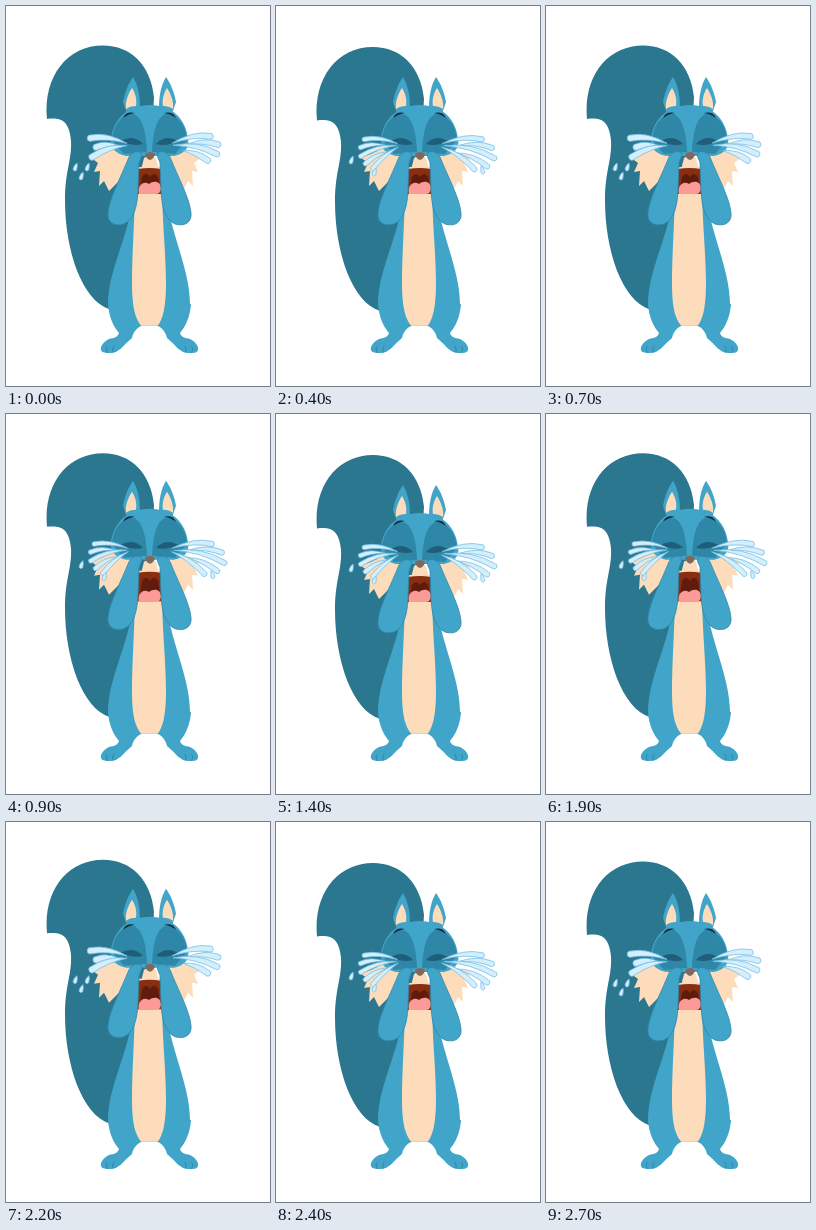
These frames come from a looping animation (264x380 px, 2800 ms). An HTML page:

```html
<!DOCTYPE html>
<html lang="en">
<head>
<meta charset="utf-8">
<title>Crying squirrel</title>
<style>
  html, body { margin: 0; width: 100%; height: 100%; overflow: hidden; background: #fff; }
  svg { display: block; width: 264px; height: 380px; }
  .tail { fill: #2b778f; }
  .blue { fill: #41a4c9; }
  .mask { fill: #2f87a7; }
  .lid { fill: #1f5d79; }
  .brow { fill: #14293a; }
  .cream { fill: #fddcbb; }
  .toe { fill: none; stroke: #2f87a8; stroke-linecap: round; }
  .arm { fill: #41a4c9; stroke: #2f87a8; stroke-width: .8; }
  .tear { fill: #d3eefc; stroke: #78bfe3; stroke-width: .8; stroke-linejoin: round; }
</style>
</head>
<body>
<svg viewBox="0 0 264 380">
  <defs>
    <g id="leg">
      <path class="blue" d="M102 298C103 312 108 321 113 327C112 331 108 332 103 333C97 336 94 341 95 344C96 347 99 347 104 347C114 347 117 339 126 332C127 327 130 322 137 319L144 298Z"/>
      <path class="toe" d="M101 341Q99 344 101 346M108 340Q106 343 107 346"/>
    </g>
    <path id="ear" class="blue" d="M121 108L117 96C119 86 122 78 127 71C132 79 134 90 134 102Z"/>
    <path id="earInside" class="cream" d="M120 103C119 96 122 88 126 82C130 88 131 95 130 100Q124 100 120 103Z"/>
    <path id="fur" class="cream" d="M106 142Q96 149 84 151L92 157L88 166L94 165L93 180L98 175L103 185L110 178L126 162L126 142Z"/>
    <path id="arm" class="arm" d="M123 151C126 146 131 144 135 147C137 150 134 153 133 157L132 185C131 203 127 214 118 218C108 221 101 216 102 207C103 193 115 171 123 151Z"/>
    <g id="eye">
      <path class="mask" d="M106 134C107 118 117 107 128 108C136 112 140 124 141 146L118 148Z"/>
      <path class="lid" d="M115 135Q127 128 137 138Q127 141 115 135Z"/>
      <path class="brow" d="M117 112Q120 105 129 107Q122 108 117 112Z"/>
    </g>
  </defs>

  <path id="tail" class="tail" d="M41 113.500C37 70 62 40 97 40C125 40 145 60 148 92L142 200L120 308L104 304C76 295 59 245 59 195C59 165 66 155 65 135C63 114 54 112 41 113.500Z"/>

  <use href="#leg"/>
  <use href="#leg" transform="matrix(-1 0 0 1 287 0)"/>
  <path class="blue" d="M127 185C126 225 102 262 102 298L137 319.500L152 319.500L184 298C184 262 163 225 160 185Z"/>
  <path class="cream" d="M129 188L156 188C157 225 160 250 160 278C160 300 157 313 152 319.500L135 319.500C129 313 126 300 126 278C126 250 128 225 129 188Z"/>

  <g id="head">
    <use href="#ear"/>
    <use href="#earInside"/>
    <g transform="matrix(-1 0 0 1 287 0)"><use href="#ear"/><use href="#earInside"/></g>
    <use href="#fur"/>
    <use href="#fur" transform="matrix(-1 0 0 1 280 0)"/>
    <path class="blue" d="M144 99C166 99 180 113 182 133C184 142 178 148 168 150L120 150C110 148 104 142 105 133C107 113 122 99 144 99Z"/>
    <use href="#eye"/>
    <use href="#eye" transform="matrix(-1 0 0 1 287 0)"/>
    <path class="cream" d="M138 152Q144 147 150 152L154 168L134 168Z"/>
    <path fill="#80685d" d="M139 148Q144 144 149 148Q148 153 144 154Q140 153 139 148Z"/>
  </g>

  <path id="chin" class="cream"/>
  <path id="mouth" fill="#8a2e12"/>
  <path id="throat" fill="#5f1c0d"/>
  <path fill="#fb9a96" d="M133 188C131 180 137 174 143 178C148 174 155 175 155 183Q154 188 150 188Z"/>

  <g id="front">
    <use href="#arm"/>
    <use href="#arm" transform="matrix(-1 0 0 1 287 0)"/>
    <g id="spray"></g>
    <g id="stream"></g>
  </g>
</svg>
<script>
const $ = id => document.getElementById(id);
const EYES = [{ x: 126, y: 138, side: -1 }, { x: 161, y: 138, side: 1 }];

// A curved teardrop, pointed at the start and round at the end
function tear(x, y, ex, ey, r) {
  const dx = ex - x, dy = ey - y, len = Math.hypot(dx, dy);
  const nx = -dy / len * r, ny = dx / len * r;
  const cx = x + dx * .55, cy = y + dy * .55 - len * .15;
  return `<path class="tear" d="M${x} ${y}Q${cx + nx} ${cy + ny} ${ex + nx} ${ey + ny}` +
    `A${r} ${r} 0 0 0 ${ex - nx} ${ey - ny}Q${cx - nx} ${cy - ny} ${x} ${y}Z"/>`;
}

// Tears spread from an eye between two angles, every other one starting further out
function fan({ x, y, side }, { count, from, to, reach, bulge, r }) {
  let out = '';
  for (let i = 0; i < count; i++) {
    const k = i / (count - 1);
    const a = (from + (to - from) * k) * Math.PI / 180;
    const far = reach + bulge * Math.sin(Math.PI * k);
    const near = far * (i % 2 ? .4 : .12);
    const at = d => [x + side * d * Math.cos(a), y + d * Math.sin(a)];
    out += tear(...at(near), ...at(far), r);
  }
  return out;
}

// Loose drops falling below the outer end of a fan
function drops(x, y, count, dx) {
  let out = '';
  for (let i = 0; i < count; i++) {
    const px = x + dx * i, py = y + 9 * (i % 2);
    out += tear(px, py, px + Math.sign(dx) * 2, py + 6, 1.9);
  }
  return out;
}

const [left, right] = EYES;
$('spray').innerHTML =
  fan(left, { count: 3, from: -8, to: 18, reach: 42, bulge: -6, r: 3.2 }) +
  fan(right, { count: 4, from: -10, to: 22, reach: 44, bulge: 8, r: 3 }) +
  drops(83, 157, 3, -6);
$('stream').innerHTML =
  fan(left, { count: 5, from: -7, to: 40, reach: 38, bulge: 5, r: 2.3 }) +
  fan(right, { count: 5, from: -6, to: 34, reach: 45, bulge: 14, r: 2.7 }) +
  drops(77, 150, 1, -6) + drops(100, 162, 1, -6) + drops(205, 160, 1, 6);

const LOOP = 2800, STEP = 100;

// The head bobs three times and the tears switch twice in ten steps
function pose(step) {
  const phase = step * 3 % 10;
  const lift = 4.4 * Math.max(0, Math.cos((phase - 6.5) * Math.PI / 5));
  const streaming = step % 5 > 2;
  const top = 163 - lift, bottom = 188 - lift * .2;
  const shift = (id, y) => $(id).setAttribute('transform', `translate(0 ${y})`);

  shift('head', -lift);
  shift('front', -lift * .8);
  shift('tail', (streaming ? 1 : -.5) - lift * .4);
  $('mouth').setAttribute('d', `M132 ${top}Q144 ${top - 2} 155 ${top}L156 ${bottom}L131 ${bottom}Z`);
  $('throat').setAttribute('d', `M134 ${bottom - 5}L136 ${top + 8}Q140 ${top + 2} 144 ${top + 8}Q148 ${top + 2} 152 ${top + 8}L154 ${bottom - 5}Z`);
  $('chin').setAttribute('d', `M131 ${top - 2}L156 ${top - 2}L158 193L129 193Z`);
  $('spray').style.display = streaming ? 'none' : '';
  $('stream').style.display = streaming ? '' : 'none';
}

function tick() {
  pose(Math.floor(performance.now() % LOOP / STEP));
  requestAnimationFrame(tick);
}
tick();
</script>
</body>
</html>
```
